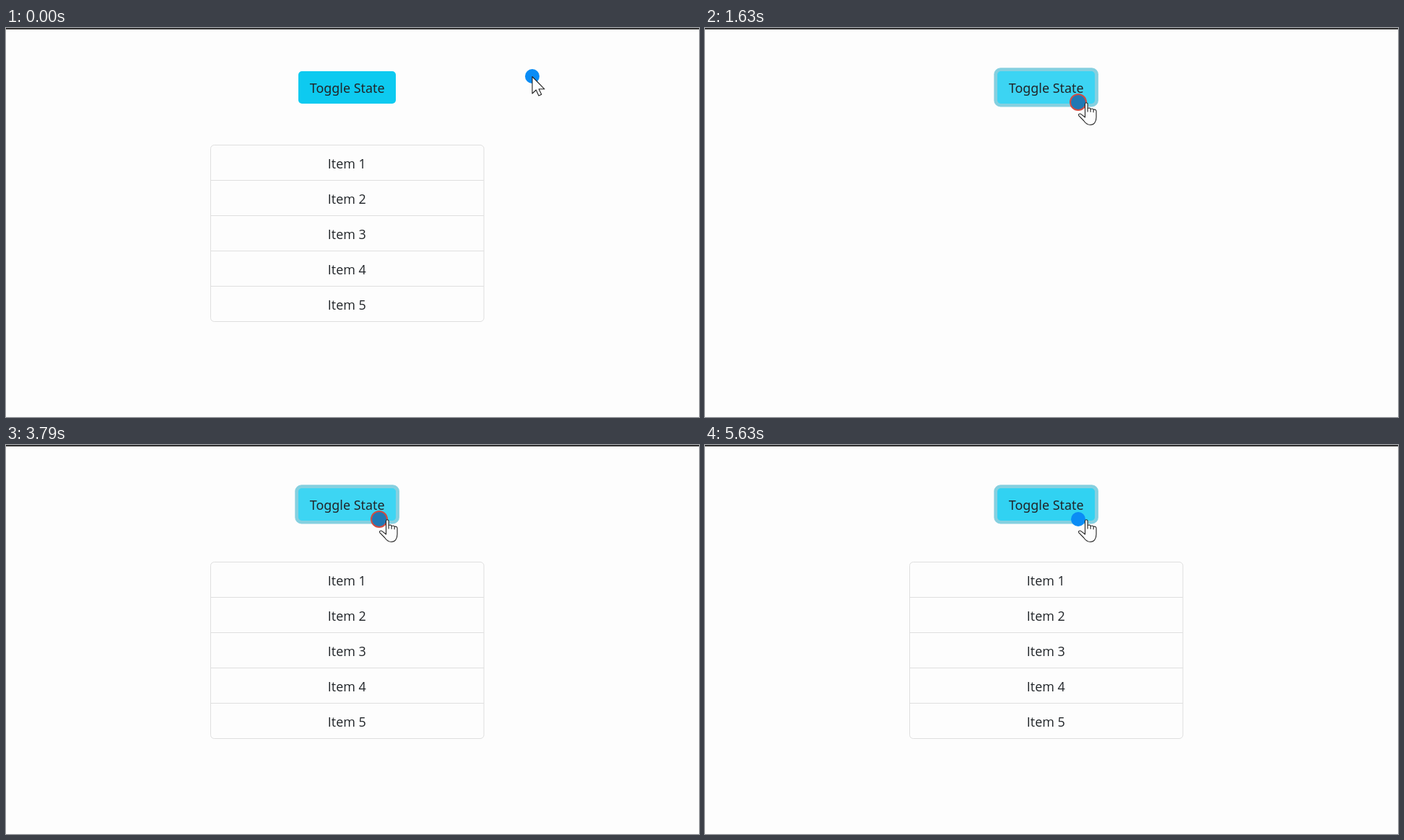
Write an HTML page that moves like this. It is 960x540 px and loops after 5670 ms.

```html
<!DOCTYPE html>
<html lang="en">
<head>
<meta charset="utf-8">
<title>Toggle list</title>
<style>
  html, body { margin: 0; width: 100%; height: 100%; overflow: hidden; background: #fdfdfd; }
  svg { display: block; width: 960px; height: 540px; }
  text { text-anchor: middle; fill: #212529; }
  .label { font: 17.9px "Noto Sans", "Open Sans", sans-serif; }
  #list text { font: 17.9px "Open Sans", sans-serif; }
  #list path, #list rect { fill: none; stroke: #dfdfdf; }
  #arrow, #hand { fill: #fdfdfd; stroke: #222; stroke-width: 1.1; stroke-linejoin: round; }
</style>
</head>
<body>
<svg viewBox="0 0 960 540">
  <rect width="960" height="2" fill="#333"/>

  <rect id="ring" x="400.3" y="55.3" width="144.6" height="54.2" rx="9" fill="#85d0e0"/>
  <rect x="405" y="60" width="135" height="45" rx="5" fill="#0dcaf0"/>
  <rect id="shine" x="405" y="60" width="135" height="45" rx="5" fill="#fff"/>
  <text class="label" x="472.7" y="90">Toggle State</text>

  <g id="list">
    <rect x="283.5" y="162.5" width="378.5" height="245" rx="5"/>
  </g>

  <g id="pointer">
    <circle r="10" fill="#0a8cf5"/>
    <circle id="press" r="11" fill="#2078b4" stroke="#d24c42" stroke-width="2"/>
    <path id="arrow" d="M0 .5V24L5.3 19L9 27L12.8 25.3L9.2 17.8H17Z"/>
    <path id="hand" d="M9.5 21V2.6a1.8 1.8 0 0 1 3.6 0V8.5q3-1.5 4 1q3-1.3 4 .8q3.6-.8 3.9 2.2V21c0 6-3 10.5-8 10.5c-5 0-7.5-3-9.5-6L1 18.8c-1.5-2 1-3.7 3-2.2ZM13.1 8.5v5M17.1 9.5v4.2M21.1 10.3v4"/>
  </g>
</svg>
<script>
  const LOOP = 5670, HOLD = 157, FADE = 150, ROW = 49;
  const MOVE = 637, HOVER = 515;
  const clicks = [980, 1540, 2300, 3070, 3640, 4380];

  const $ = id => document.getElementById(id);
  const clamp = v => Math.min(1, Math.max(0, v));
  const smooth = u => u * u * (3 - 2 * u);
  const fade = elapsed => 1 - (1 - clamp(elapsed / FADE)) ** 2;
  const show = (id, on) => $(id).setAttribute("visibility", on ? "visible" : "hidden");

  function add(tag, attrs, content = "") {
    const el = document.createElementNS("http://www.w3.org/2000/svg", tag);
    for (const name in attrs) el.setAttribute(name, attrs[name]);
    el.textContent = content;
    $("list").append(el);
  }

  for (let i = 0; i < 5; i++) {
    if (i) add("path", { d: `M284 ${162.5 + i * ROW}H662` });
    add("text", { x: 472.3, y: 195 + i * ROW }, `Item ${i + 1}`);
  }

  function draw(t) {
    // The pointer glides to the button on a slight arc
    const e = smooth(clamp(t / MOVE));
    const x = 729 - 212 * e;
    const y = 67 + 36 * e + 50 * e * (1 - e);
    $("pointer").setAttribute("transform", `translate(${x} ${y})`);

    const over = t >= HOVER;
    show("arrow", !over);
    show("hand", over);

    // Each release flips the list
    const released = clicks.filter(c => t >= c + HOLD).length;
    const pressed = clicks.some(c => t >= c && t < c + HOLD);
    show("list", released % 2 === 0);
    show("press", pressed);

    // Hover lightens the button, pressing lightens it a little more
    const active = clicks.reduce((sum, c) => sum + fade(t - c) - fade(t - c - HOLD), 0);
    $("shine").setAttribute("opacity", 0.15 * fade(t - HOVER) + 0.05 * active);
    $("ring").setAttribute("opacity", fade(t - clicks[0]));
  }

  let start;
  function tick(now) {
    start ??= now;
    draw((now - start) % LOOP);
    requestAnimationFrame(tick);
  }
  draw(0);
  requestAnimationFrame(tick);
</script>
</body>
</html>
```
